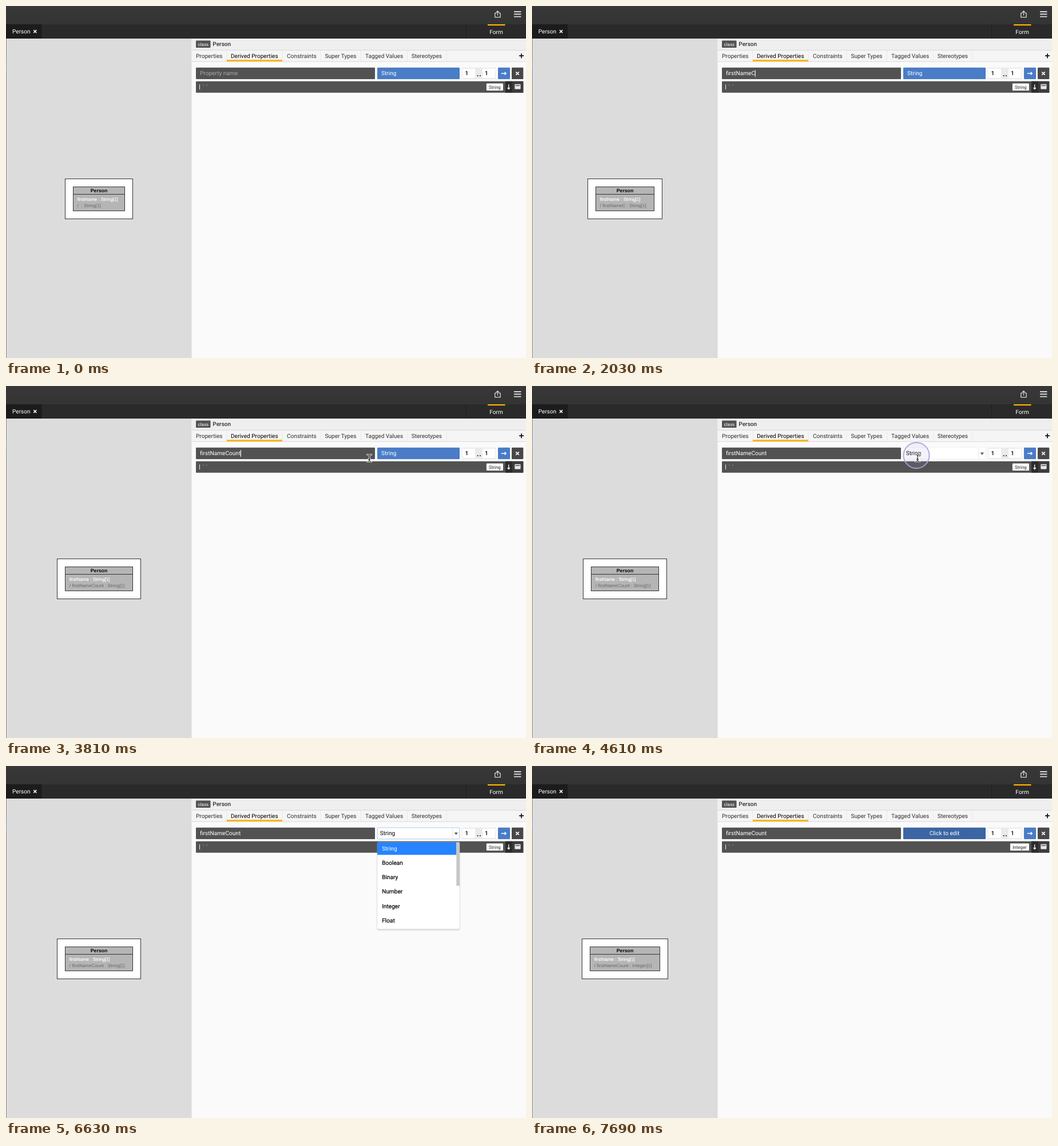
An HTML page that plays this animation: 909x616 px, repeating every 8000 ms.

```html
<!DOCTYPE html>
<html lang="en">
<head>
<meta charset="utf-8">
<title>Derived property editor</title>
<style>
html, body { margin: 0; width: 100%; height: 100%; overflow: hidden; background: #fafafa; }
svg { display: block; }
text { font: 10.1px Roboto, sans-serif; white-space: pre; text-rendering: geometricPrecision; fill: #2e2e2e; }
.light { fill: #fff; }
.dark { fill: #000; }
.medium { font-weight: 500; }
.small { font-size: 7.9px; }
.mid { text-anchor: middle; }
.option { fill: #000; stroke: #000; stroke-width: .2; }
.uml { font: 8px "Liberation Sans", Arial, sans-serif; }
.title { font: bold 8.7px "Liberation Sans", Arial, sans-serif; fill: #000; }
.line { fill: none; stroke-linecap: round; stroke-linejoin: round; }
</style>
</head>
<body>
<svg id="stage" width="909" height="616" viewBox="0 0 909 616">
  <defs>
    <linearGradient id="bar" x2="0" y2="1"><stop stop-color="#383838"/><stop offset="1" stop-color="#343434"/></linearGradient>
    <filter id="shadow" x="-10%" y="-10%" width="120%" height="130%"><feDropShadow dx="0" dy="1.4" stdDeviation="1" flood-opacity=".22"/></filter>
    <path id="beam" d="M-3.6-6Q-.6-6 0-4.4Q.6-6 3.6-6M0-4.4V4.6M-3.6 6.2Q-.6 6.2 0 4.6Q.6 6.2 3.6 6.2M-1.6 2.2H1.6"/>
  </defs>

  <!-- Top bars -->
  <rect width="909" height="32" fill="url(#bar)"/>
  <rect y="32" width="909" height="25" fill="#2a2a2a"/>
  <rect y="32" width="62.5" height="25" fill="#1c1c1c"/>
  <rect x="803" y="32" width="1" height="25" fill="#202020"/>
  <rect x="842" y="32" width="30.5" height="2.2" fill="#ffb400"/>
  <text x="11" y="47.8" class="light">Person</text>
  <path d="M48.3 42l5 5m0-5l-5 5" stroke="#fff" stroke-width="1.7"/>
  <text x="857" y="48.8" class="light mid">Form</text>
  <path class="line" d="M856.7 12.4h-2v7.3h9.4v-7.3h-2M859.4 16V9.2M857.2 11l2.2-2.3 2.2 2.3" stroke="#d8d8d8" stroke-width="1.3"/>
  <path d="M888 10h12.4M888 14.3h12.4M888 18.6h12.4" stroke="#d8d8d8" stroke-width="1.9"/>

  <!-- Diagram -->
  <rect y="57" width="324.5" height="559" fill="#dcdcdc"/>
  <rect y="57" width="1" height="559" fill="#8a8a8a"/>
  <rect y="97" width="1" height="14" fill="#6f9fd8"/>
  <rect id="frame" y="302.5" height="70" fill="#fff" stroke="#333"/>
  <rect id="node" y="316.5" height="42" fill="#b5b5b5" stroke="#333"/>
  <path id="divider" stroke="#333"/>
  <text x="162.5" y="326.3" class="title mid">Person</text>
  <text id="first" y="341.3" class="uml light" stroke="#fff" stroke-width=".2">firstName : String[1]</text>
  <text id="derived" y="351.6" class="uml" style="fill:#666"></text>

  <!-- Form -->
  <rect x="324.5" y="57" width="585" height="20" fill="#efefef"/>
  <rect x="324.5" y="77" width="585" height="20" fill="#f5f5f5"/>
  <path d="M324.5 77.3H909M324.5 97.3H909" stroke="#d2d2d2" stroke-width=".8"/>
  <rect x="332" y="60.5" width="25.5" height="12.5" rx="1" fill="#525252"/>
  <text x="344.8" y="69.5" class="light small mid">class</text>
  <text x="361.3" y="70.2" class="medium">Person</text>
  <g id="tabs"></g>
  <rect x="386" y="94" width="97" height="3" fill="#ffb400"/>
  <path d="M897 87.2h8M901 83.2v8" stroke="#111" stroke-width="1.8"/>

  <!-- Property row -->
  <rect x="332" y="107.7" width="313" height="20.3" rx="1" fill="#525252"/>
  <text id="name" x="339" y="121.4"></text>
  <rect id="nameCaret" y="112" width="1" height="12" fill="#fff"/>
  <g id="button">
    <rect x="649" y="107.7" width="144" height="20.3" rx="1"/>
    <text y="121.4" class="light"></text>
  </g>
  <g id="select">
    <rect x="649.3" y="108" width="143.4" height="19.7" rx="1" fill="#fff" stroke-width=".7"/>
    <path d="M780.7 108.7v18.6" stroke="#ddd" stroke-width=".8"/>
    <path d="M783.6 116.4h6.4l-3.2 4z" fill="#555"/>
    <text x="653.8" y="121.4" class="dark"></text>
    <rect id="queryCaret" y="112" width="1" height="12" fill="#111"/>
  </g>
  <rect x="797" y="107.7" width="59" height="20.3" fill="#ebebeb"/>
  <rect x="798" y="109.7" width="22" height="16.3" fill="#fff"/>
  <rect x="833" y="109.7" width="22" height="16.3" fill="#fff"/>
  <text x="802.5" y="121.4" class="dark medium">1</text>
  <text x="837" y="121.4" class="dark medium">1</text>
  <path d="M823.8 122h1.8M828 122h1.8" stroke="#333" stroke-width="1.8"/>
  <rect x="860" y="107.7" width="21" height="20.3" rx="1" fill="#4a7cc7"/>
  <path class="line" d="M866.3 118h7.8M872 115.9l2.3 2.1-2.3 2.1" stroke="#fff" stroke-width="1.4"/>
  <rect x="884" y="107.7" width="20.3" height="20.3" rx="1" fill="#484848"/>
  <path d="M891.3 115.3l5.4 5.4m0-5.4l-5.4 5.4" stroke="#fff" stroke-width="1.7"/>

  <!-- Expression row -->
  <rect x="332" y="131.7" width="572.3" height="20" rx="1" fill="#525252"/>
  <rect x="873" y="131.7" width="12" height="20" fill="#2c2c2c"/>
  <rect x="885" y="131.7" width="19.3" height="20" fill="#3c3c3c"/>
  <path d="M338.5 137.3v8.7" stroke="#e8e8e8"/>
  <path d="M344.9 137v2.8M350.8 137v2.8" stroke="#d8744f" stroke-width=".9"/>
  <rect id="badge" y="135.5" height="12.5" rx="1" fill="#fafafa"/>
  <text id="badgeText" y="144.5" class="small mid"></text>
  <path class="line" d="M878.7 137.8v7.3M876.9 143.5l1.8 2 1.8-2" stroke="#fff" stroke-width="1.3"/>
  <rect x="889.3" y="136.8" width="10.2" height="8.8" rx="1" fill="#e8e8e8"/>
  <path d="M890.5 139.2h7.8" stroke="#3c3c3c" stroke-width="1.3"/>

  <g id="menu"></g>
  <circle id="ring" cx="672" cy="121.5" fill="#a9a5dc" fill-opacity=".13" stroke="#a9a5dc" stroke-width="2"/>
  <g id="pointer" class="line">
    <use href="#beam" stroke="#fff" stroke-width="2.8"/>
    <use href="#beam" stroke="#000" stroke-width="1.1"/>
  </g>
</svg>
<script>
const $ = id => document.getElementById(id);
const set = (el, attrs) => { for (const k in attrs) el.setAttribute(k, attrs[k]); };
const show = (el, on) => { el.style.display = on ? '' : 'none'; };
const write = (el, s) => { if (el.textContent !== s) el.textContent = s; };
const width = el => el.getComputedTextLength();
const clamp = v => Math.max(0, Math.min(1, v));

const LOOP = 8000, BLINK = 490;
const HOVER = 3970, PRESS = 4210, OPEN = 4290, MENU = 5990, PICK = 7690;
const NAME = 'firstNameCount';
const nameKeys = [160, 320, 480, 640, 720, 1300, 1380, 1540, 1620, 2030, 2190, 2350, 2430, 2510];
const queryKeys = [[5990, 'I'], [6070, 'In'], [6150, 'Int'], [6310, 'Inte'], [6390, 'Int'], [6470, 'In'],
  [6550, 'I'], [6630, ''], [6710, 'I'], [6790, 'In'], [6950, 'Int']];
const types = ['String', 'Boolean', 'Binary', 'Number', 'Integer', 'Float', 'Decimal', 'Date', 'StrictDate', 'DateTime', 'LatestDate'];
const route = [[3090, 490, 130.5], [3810, 636.5, 126], [4050, 674, 126]];

const tabs = [['Properties', 332], ['Derived Properties', 393], ['Constraints', 491], ['Super Types', 557.5],
  ['Tagged Values', 628], ['Stereotypes', 708.7]];
$('tabs').innerHTML = tabs.map(([s, x], i) => `<text x="${x}" y="90.6" ${i === 1 ? 'class="dark"' : ''}>${s}</text>`).join('') +
  [386, 483, 550, 620.5, 701.5, 770].map(x => `<path d="M${x} 78v19" stroke="#e9e9e9"/>`).join('');

const blinkOn = since => since % (2 * BLINK + 20) < BLINK;

// The class box is centred, fits its longest line and sits on whole pixels.
function drawDiagram(name, type) {
  write($('derived'), `/ ${name} : ${type}[1]`);
  const fit = 1.05 * Math.max(width($('first')), width($('derived'))) + 16.3;
  const x = Math.floor(162.5 - fit / 2) + .5, w = 325 - 2 * x;
  set($('node'), { x, width: w });
  set($('frame'), { x: x - 14, width: w + 28 });
  set($('divider'), { d: `M${x} 329.5h${w}` });
  set($('first'), { x: x + 7.3 });
  set($('derived'), { x: x + 7.3 });
}

function drawName(t, count) {
  const el = $('name');
  write(el, count ? NAME.slice(0, count) : 'Property name');
  el.style.fill = count ? '#fff' : '#a8a8a8';
  show($('nameCaret'), count && t < OPEN && blinkOn(t - nameKeys[count - 1]));
  set($('nameCaret'), { x: 338.7 + width(el) });
}

function drawButton(t) {
  const hover = t >= HOVER;
  const [box, label] = $('button').children;
  set(box, { fill: hover ? '#3b66a3' : '#4a7cc7' });
  write(label, hover ? 'Click to edit' : 'String');
  set(label, { x: hover ? 721 : 656, 'text-anchor': hover ? 'middle' : 'start' });
  show($('button'), t < OPEN || t >= PICK);
}

let shownQuery;
function drawMenu(query) {
  if (query === shownQuery) return;
  shownQuery = query;
  const found = types.filter(s => s.toLowerCase().includes(query.toLowerCase()));
  const items = found.slice(0, 6), scrolls = found.length > items.length;
  $('menu').innerHTML =
    `<rect x="649" y="133.4" width="144" height="${25.2 * items.length + .6}" rx="2.5" fill="#fff" stroke="#ccc" stroke-width=".4" filter="url(#shadow)"/>` +
    `<rect x="649" y="133.4" width="${scrolls ? 138.3 : 144}" height="22.1" fill="#2684ff"/>` +
    (scrolls ? '<rect x="787.3" y="133.6" width="5.7" height="76" fill="#c6c6c6"/>' : '') +
    items.map((s, i) => `<text x="657.2" y="${147.8 + 25.2 * i}" class="${i ? 'option' : 'light'}">${s}</text>`).join('');
}

function drawSelect(t) {
  const [key, query] = queryKeys.findLast(k => t >= k[0]) || [0, ''];
  const menuOpen = t >= MENU && t < PICK;
  const label = $('select').querySelector('text');
  show($('select'), t >= OPEN && t < PICK);
  set($('select').firstElementChild, { stroke: menuOpen ? '#8fb8ee' : '#f0f0f0' });
  write(label, query || 'String');
  show($('queryCaret'), query && blinkOn(t - key));
  set($('queryCaret'), { x: 653.5 + width(label) });
  show($('menu'), menuOpen);
  if (menuOpen) drawMenu(query);
}

function drawBadge(type) {
  write($('badgeText'), type);
  const w = width($('badgeText')) + 8.5;
  set($('badge'), { x: 869 - w, width: w });
  set($('badgeText'), { x: 869 - w / 2 });
}

function drawPointer(t) {
  const step = 10 + 80 * Math.floor((t - 10) / 80);
  let [, x, y] = route[0];
  for (let i = 1; i < route.length; i++) {
    const [t0] = route[i - 1], [t1, x1, y1] = route[i];
    const p = clamp((step - t0) / (t1 - t0)), e = p * p * (3 - 2 * p);
    x += (x1 - x) * e;
    y += (y1 - y) * e;
  }
  show($('pointer'), t >= route[0][0] && t < MENU);
  set($('pointer'), { transform: `translate(${x} ${y})` });

  const p = clamp((step - 4450) / 480);
  show($('ring'), t >= PRESS && t < 5090);
  set($('ring'), { r: 26 - 8 * p * (2 - p), opacity: Math.max(.08, 1 - p * p) });
}

function draw() {
  const t = performance.now() % LOOP;
  const count = nameKeys.filter(k => t >= k).length;
  const type = t >= PICK ? 'Integer' : 'String';
  drawDiagram(NAME.slice(0, count), type);
  drawName(t, count);
  drawButton(t);
  drawSelect(t);
  drawBadge(type);
  drawPointer(t);
  requestAnimationFrame(draw);
}
draw();
</script>
</body>
</html>
```
